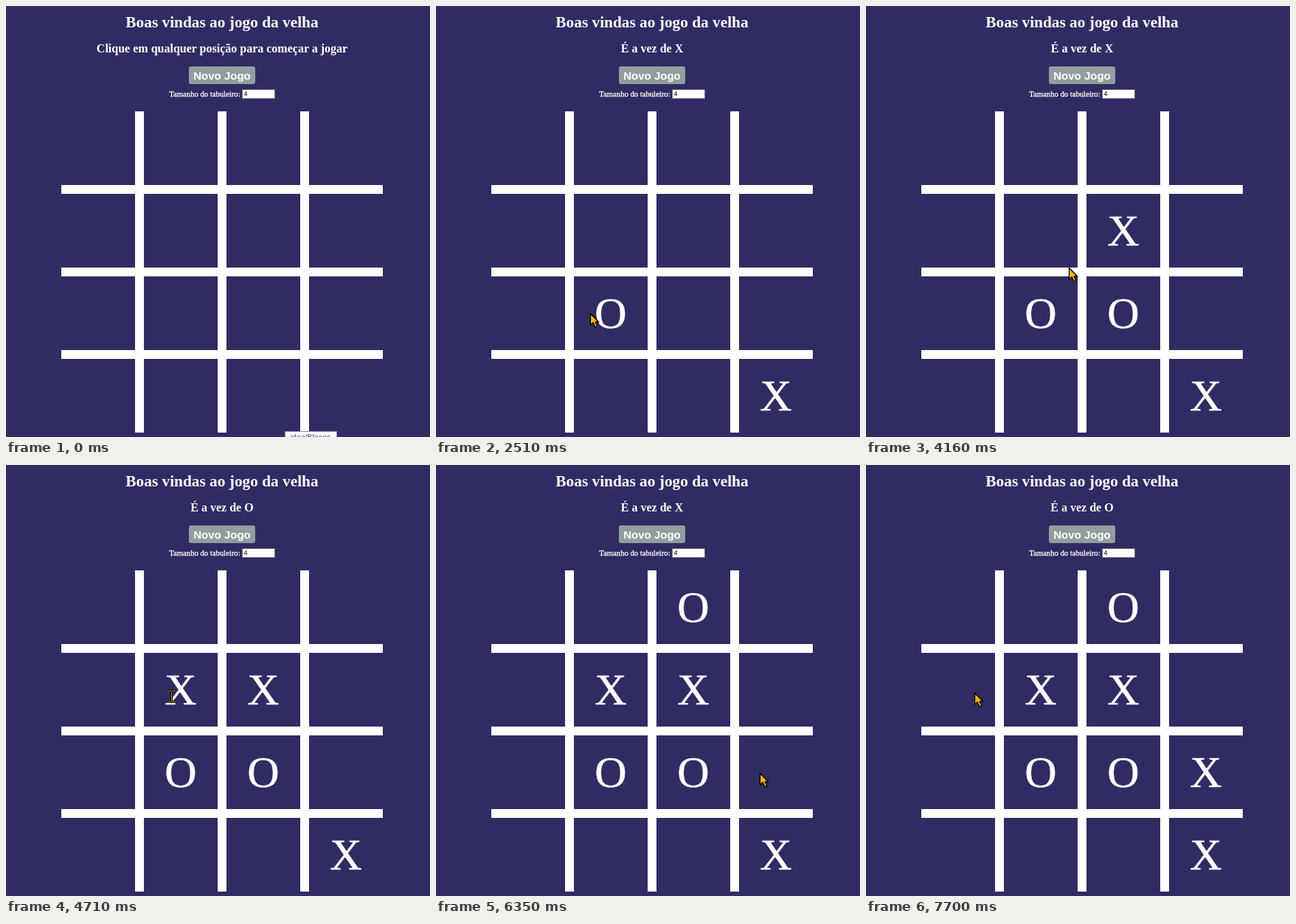
Write an HTML page that moves like this. It is 575 px wide and 585 px high and loops after 8 s.

```html
<!DOCTYPE html>
<html lang="pt-BR">
<head>
<meta charset="utf-8">
<title>Jogo da velha</title>
<style>
  html, body { margin: 0; width: 100%; height: 100%; overflow: hidden; background: #302b63; }
  svg { display: block; }
  text { font-family: "Liberation Serif", "Times New Roman", serif; fill: #fff; text-anchor: middle; }
  .sans { font-family: "Liberation Sans", Arial, sans-serif; }
  .bold { font-weight: bold; }
  .mark { font-size: 60px; stroke: #fff; stroke-width: .5; }
  .label { text-anchor: start; stroke: #fff; stroke-width: .3; }
</style>
</head>
<body>
<svg width="575" height="585" viewBox="0 0 575 585">
  <text class="bold" x="293" y="29" font-size="21.33">Boas vindas ao jogo da velha</text>
  <text class="bold" id="status" x="293" y="63" font-size="16"></text>
  <rect x="248" y="82" width="90" height="24" rx="3" fill="#929d9e"/>
  <text class="sans bold" x="293" y="100" font-size="15">Novo Jogo</text>
  <text class="label" x="221.3" y="123" font-size="10.67">Tamanho do tabuleiro:</text>
  <rect x="320.5" y="113.5" width="44" height="12" fill="#fff" stroke="#767676"/>
  <text class="sans" x="325" y="122" font-size="8.9" style="fill:#000">4</text>

  <path id="grid" stroke="#fff" stroke-width="12"/>
  <g id="marks"></g>

  <g id="tooltip">
    <rect x="378.5" y="577.5" width="70" height="20" fill="#fff" stroke="#8d8aa0"/>
    <text class="sans" x="413" y="589" font-size="10.67" style="fill:#54468c">idealBlocos</text>
  </g>

  <path id="arrow" d="M0 0V15.5L3.6 12.3L6.6 18.5L9.4 17.2L6.6 11.5H11.3Z"
        fill="#ffb400" stroke="#000" stroke-width="1.3" stroke-linejoin="round"/>
  <g id="beam" fill="none">
    <path id="beamShape" d="M-5 -7.5H-1L0 -6.5L1 -7.5H5M0 -6.5V6.5M-5 7.5H-1L0 6.5L1 7.5H5"
          stroke-width="3" stroke="#000"/>
    <path id="beamCore" stroke="#e0a010"/>
  </g>
</svg>
<script>
const LOOP = 8000, GLIDE = 480;
const CELL = 100, PITCH = 112, LEFT = 75, TOP = 143, COUNT = 4;
const SIZE = PITCH * COUNT - 12;

// Each turn: the pointer departs, glides to x, y and clicks there
const turns = [
  { depart: 190, click: 670, x: 445, y: 519 },
  { depart: 1280, click: 2180, x: 209, y: 417 },
  { depart: 2510, click: 3130, x: 343, y: 318 },
  { depart: 3200, click: 3820, x: 356, y: 420 },
  { depart: 3960, click: 4710, x: 224, y: 314 },
  { depart: 4980, click: 5670, x: 345, y: 218 },
  { depart: 5870, click: 6690, x: 439, y: 418 },
  { depart: 6960, click: LOOP, x: 147, y: 309 }
];
const entry = { x: 521, y: 584 };

const byId = id => document.getElementById(id);
const show = (node, visible) => node.setAttribute("visibility", visible ? "visible" : "hidden");
const place = (node, x, y) => node.setAttribute("transform", `translate(${x} ${y})`);
const cellCenter = (pos, start) => start + Math.floor((pos - start) / PITCH) * PITCH + CELL / 2;

let lines = "";
for (let i = 1; i < COUNT; i++) {
  const offset = i * PITCH - 6;
  lines += `M${LEFT + offset} ${TOP}v${SIZE}M${LEFT} ${TOP + offset}h${SIZE}`;
}
byId("grid").setAttribute("d", lines);
byId("beamCore").setAttribute("d", byId("beamShape").getAttribute("d"));

turns.forEach((turn, i) => {
  turn.cx = cellCenter(turn.x, LEFT);
  turn.cy = cellCenter(turn.y, TOP);
  turn.mark = document.createElementNS("http://www.w3.org/2000/svg", "text");
  turn.mark.textContent = "XO"[i % 2];
  turn.mark.setAttribute("class", "mark");
  place(turn.mark, turn.cx, turn.cy + 20);
  byId("marks").append(turn.mark);
});

function pointerAt(t) {
  let { x, y } = entry;
  for (const turn of turns) {
    const progress = Math.min(Math.max((t - turn.depart) / GLIDE, 0), 1);
    const eased = Math.sin(progress * Math.PI / 2);
    x += (turn.x - x) * eased;
    y += (turn.y - y) * eased;
  }
  return [Math.round(x), Math.round(y)];
}

function draw() {
  const t = performance.now() % LOOP;
  const [x, y] = pointerAt(t);
  const played = turns.filter(turn => t >= turn.click);
  const entered = t >= turns[0].depart;
  // The pointer becomes a text cursor over a placed mark
  const overText = played.some(turn => Math.abs(x - turn.cx) < 21.7 && Math.abs(y - turn.cy) < 34);

  for (const turn of turns) show(turn.mark, t >= turn.click);
  byId("status").textContent = played.length
    ? `É a vez de ${"XO"[played.length % 2]}`
    : "Clique em qualquer posição para começar a jogar";
  show(byId("tooltip"), !played.length);
  show(byId("arrow"), entered && !overText);
  show(byId("beam"), entered && overText);
  place(byId("arrow"), x + .5, y + .5);
  place(byId("beam"), x + .5, y);
  requestAnimationFrame(draw);
}
draw();
</script>
</body>
</html>
```
